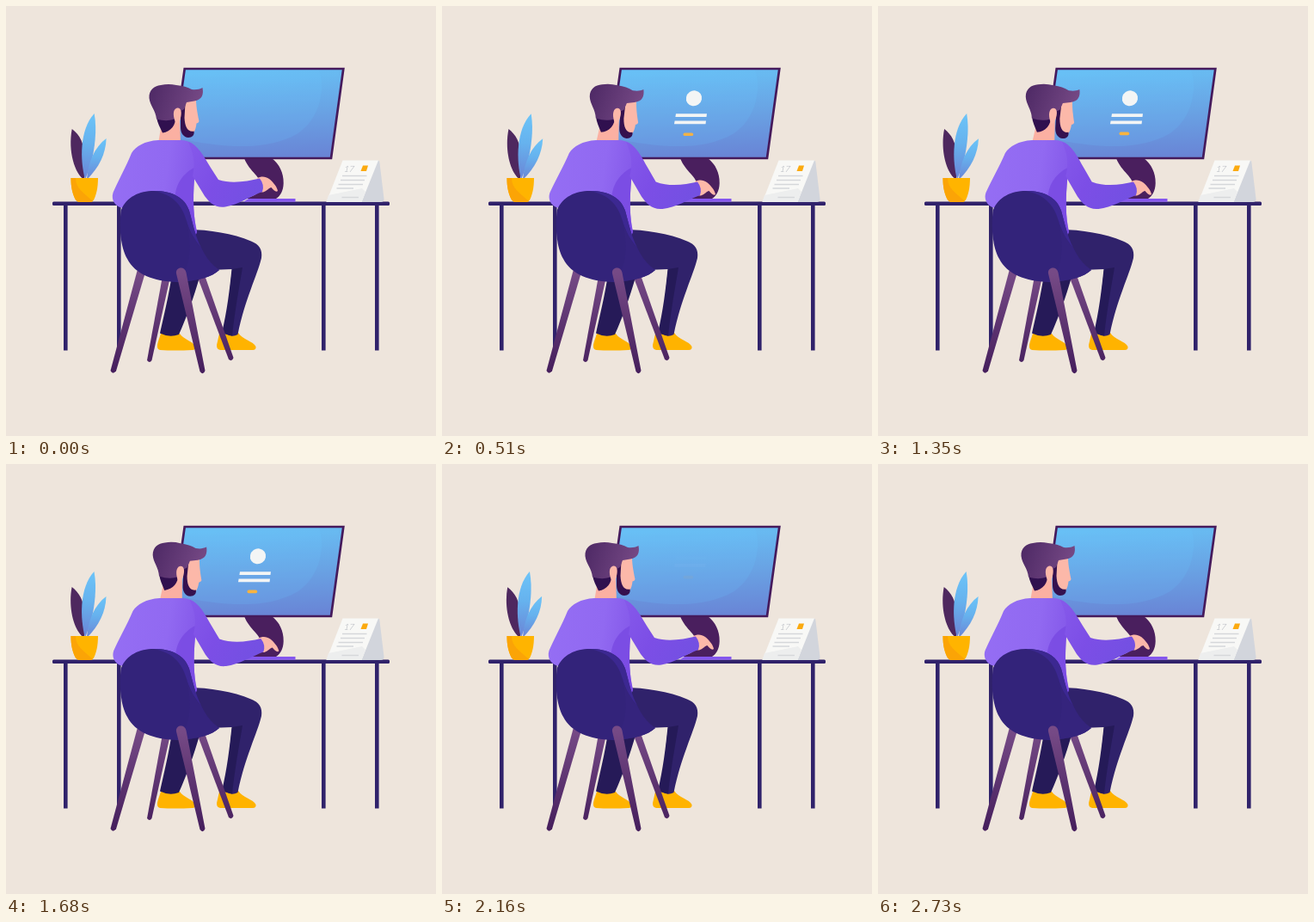
An HTML page for the animation above (2760 ms loop, 500 by 500 pixels).

```html
<!DOCTYPE html>
<html lang="en">
<head>
<meta charset="utf-8">
<title>Desk work</title>
<style>
html, body { margin: 0; width: 100%; height: 100%; overflow: hidden; background: #eee5dc; }
svg { display: block; width: 100%; height: 100%; }
</style>
</head>
<body>
<svg viewBox="0 0 500 500">
  <defs>
    <linearGradient id="screenFill" x1=".45" y1="0" x2=".55" y2="1">
      <stop offset="0" stop-color="#68bff4"/><stop offset=".5" stop-color="#69a3e4"/><stop offset="1" stop-color="#6985d6"/>
    </linearGradient>
    <linearGradient id="leafFill" x1="0" y1="0" x2="0" y2="1">
      <stop offset="0" stop-color="#6cc4f8"/><stop offset=".45" stop-color="#66b2ee"/><stop offset="1" stop-color="#6b84d6"/>
    </linearGradient>
    <linearGradient id="hairFill" x1="0" y1=".3" x2="1" y2=".5">
      <stop offset="0" stop-color="#4f2a66"/><stop offset="1" stop-color="#774a86"/>
    </linearGradient>
    <linearGradient id="bodyFill" x1="0" y1="0" x2="1" y2=".15">
      <stop offset="0" stop-color="#956ef4"/><stop offset=".65" stop-color="#9169f1"/><stop offset="1" stop-color="#8458e9"/>
    </linearGradient>
    <linearGradient id="armFill" gradientUnits="userSpaceOnUse" x1="215" y1="165" x2="300" y2="212">
      <stop offset="0" stop-color="#8558ea"/><stop offset=".45" stop-color="#7c4ee6"/><stop offset="1" stop-color="#7350e2"/>
    </linearGradient>
    <linearGradient id="woodFill" gradientUnits="userSpaceOnUse" x1="0" y1="310" x2="0" y2="425">
      <stop offset="0" stop-color="#764a86"/><stop offset="1" stop-color="#461f5d"/>
    </linearGradient>
  </defs>

  <g fill="#30226b">
    <path d="M67 230h4.600v170.500h-4.600zM129 230h4.600v170.500h-4.600zM367 230h4.600v170.500h-4.600zM429 230h4.600v170.500h-4.600z"/>
    <rect x="54" y="227.500" width="392" height="4.500" rx="1.500"/>
  </g>

  <path fill="#4a1f5e" d="M277 177H309C318 184 323 194 322.700 206C322.500 215 319 221 314 224H276C286 222 294 219 297 211C298 199 283 193 277 177Z"/>
  <path d="M207.700 73H392.300L378 177H193Z" fill="url(#screenFill)"/>
  <path d="M207 74H364C372 96 365 132 338 149C308 166 262 168 197 153Z" fill="#6cc9fb" opacity=".16"/>
  <path d="M207.700 73H392.300L378 177H193Z" fill="none" stroke="#451a5c" stroke-width="2.700"/>
  <g id="content" fill="#f3f5f5">
    <ellipse cx="293" cy="107.300" rx="9.300" ry="8.800" transform="rotate(-35 293 107.300)"/>
    <path d="M272 125.200H308L307.500 129H271.400Z"/>
    <path d="M270.600 133.500H307L306.500 137.200H270Z"/>
    <rect x="280.500" y="146.600" width="11.700" height="3.700" rx="1.700" fill="#f8b340"/>
  </g>

  <path fill="#d2d5dc" d="M432 179.500Q434 179.500 434.300 181L439.500 224Q439.500 228 436 228H412Z"/>
  <path fill="#f8f8f6" d="M391.500 179.500H433L413.500 228H372.500Z"/>
  <path fill="#edeeee" d="M375 220L414 212L418 216L413.500 228H372.500Z"/>
  <text transform="translate(392.500 192.500) skewX(-14)" font-family="Lato, Inter, sans-serif" font-size="10" font-weight="300" fill="#a9adb6">17</text>
  <path fill="#fbaa10" d="M415 185.500H421L419 192H412.500Z"/>
  <path fill="none" stroke="#d5d7da" stroke-width="1.700" d="M391 197.500H419.500M389 202.500H417M386.500 207.500H415M384.500 212H404M390.500 222.500H410"/>

  <g id="leaves">
    <path fill="#4e285f" d="M77 143C86 150 92 160 91 178L91 202C80 195 72 169 77 143Z"/>
    <path fill="url(#leafFill)" d="M102.500 125C106 145 103 165 99 183L92 202C86 180 85 144 102.500 125Z"/>
    <path fill="url(#leafFill)" d="M116.500 154C116 172 108 188 94 202C95 182 103 164 116.500 154Z"/>
  </g>
  <path fill="#ffb400" d="M75.500 200H107C107 212 104.500 221 102 225.500Q100.500 228 97 228H86Q83 228 81 225.500C77 218 75.500 210 75.500 200Z"/>
  <path fill="#fba406" d="M75.500 200H81C81 212 90 217 101 227Q100 228 97 228H86Q83 228 81 225.500C77 218 75.500 210 75.500 200Z"/>

  <path fill="#8556ee" d="M282 224H336.500V227.700H276Z"/>

  <g fill="#ffb300">
    <path d="M180 381L202 381C207 388 218 390 220 396Q220.500 400 217 400Q196 401 179 400Q174 399 177 390Z"/>
    <path d="M248 381L270 380C275 388 288 390 290.500 396Q291 400 287 400H249Q243 399 246 390Z"/>
  </g>
  <path fill="#261a58" d="M193 312H226C218 340 210 362 201 382Q190 386 179 380.500C184 358 189 338 193 312Z"/>
  <path fill="#30226b" d="M212 260C236 260 264 264.500 285 273.500C294 277 298.500 283 297 293C292 314 278 340 269.500 382Q262 386 255 380.500C258 355 260 330 263 306L238 307L205 300Z"/>
  <path fill="#251a58" d="M262.500 306L275 304C271 328 266 355 263 383.500Q258 383 251 380C257 355 260 330 262.500 306Z"/>

  <g id="head">
    <path fill="#fbb0a2" d="M180 142L177 160H203L202 130H190Z"/>
    <path fill="#fcb8a9" d="M204 112L221 108C221 115 222 122 224.500 134Q224 136 221.500 136.500C221 141 220 145 218 147.500L206 146Z"/>
    <path fill="#30104f" d="M175 129L197 128C198 138 192 146 182 147.500C179 141 176 136 175 129Z"/>
    <path fill="#35114f" d="M203 119L208.500 113L207.500 130C208 140 211 147 218.500 145.500C219.500 150 216.500 153 212 153C206.500 152.500 203 148 203 141Z"/>
    <path fill="url(#hairFill)" d="M175 131.500C174 121 167.500 116 166.500 107C166 98 172 93 180 92Q189 90 198 92Q209 93 216 97C221 97.500 225 97 228.500 95C230 103 228 109 219 110.500L210 112L207 120L203 122C201 117 196 120 196 126L197 131Q188 135 175 131.500Z"/>
    <path fill="#fcb8a9" d="M199 118.500C204 118 204.500 124 203 130C202 135 200 138 197.500 136C194.500 130 193 120 199 118.500Z"/>
  </g>

  <g id="torso">
    <path fill="url(#bodyFill)" d="M177 156C161 157 151 163 146 171C140 186 130 204 124.500 217C121.500 226 128 234 136 235L146 260L218 275L222 262C218 245 217 228 219 200L226 175C224 163 214 156 203 156Z"/>
    <path fill="#7a4ae3" opacity=".85" d="M219 188C203 196 195 212 197 228L214 270L222 264C218 245 217 228 219 200Z"/>
  </g>

  <path id="hand" fill="#fcb8a9" d="M292 200C297 197.500 302 198 306 201C311 205 315.500 211 316 215C314 217 311 214 308.500 211C306 211 304 215 299 216.500L293 216Z"/>
  <path id="arm" fill="url(#armFill)"/>

  <g id="chair" stroke-linejoin="round">
    <g fill="url(#woodFill)">
      <path d="M181.500 317H190.500L169.500 412Q167 416 164 412Z"/>
      <path d="M223 316L231 313L264.500 409Q263 414 259 411Z"/>
      <path d="M152.500 308H162.500L128 424.500Q124 429 121.500 424Z"/>
    </g>
    <path fill="#33237a" d="M134 237C140 222 155 215 172 215C194 215 208 223 213 238C217 252 220 268 227 281C234 296 241 302 248 307C240 315 222 320 198 321C172 320 150 312 141 294C133 280 131 255 134 237Z"/>
    <path fill="#3c2891" d="M172 215C194 215 208 223 213 238C217 252 220 268 227 281C220 273 213 262 210 250C205 232 194 219 172 215Z"/>
    <path fill="#35247d" d="M210 250C213 262 220 273 227 281C234 296 241 302 248 307C240 315 222 320 198 321C212 308 218 290 210 250Z"/>
    <path fill="url(#woodFill)" d="M198 311C197 303 208 302 209.500 310L231.500 424Q229.500 430 225.500 425Z"/>
  </g>
</svg>
<script>
const LOOP = 2760;
const $ = id => document.getElementById(id);
const items = [...$('content').children];
const ENTER = [100, 140, 170, 200], LEAVE = [1770, 1820, 1840, 1860];
const baseTurn = items.map(el => el.getAttribute('transform') || '');

// Wrist offset: time, x, y
const wristKeys = [
  [0, 0, 0], [480, 2, 4], [700, 2, 4], [930, -1, 7],
  [1160, 2, 4], [1500, 2, 4], [1950, 0, 0], [LOOP, 0, 0]
];

function ease(t, start, length) {
  const p = Math.min(1, Math.max(0, (t - start) / length));
  return (1 - Math.cos(Math.PI * p)) / 2;
}

function wristAt(t) {
  const i = wristKeys.findIndex(k => k[0] > t);
  const a = wristKeys[i - 1], b = wristKeys[i];
  const p = ease(t, a[0], b[0] - a[0]);
  return [a[1] + (b[1] - a[1]) * p, a[2] + (b[2] - a[2]) * p];
}

function armPath(lean, [dx, dy]) {
  const at = (x, y, follow) => {
    const shift = lean * (262 - y) / 48 * (1 - follow);
    return `${(x + shift + dx * follow).toFixed(2)} ${(y + dy * follow).toFixed(2)}`;
  };
  return `M${at(212, 158, 0)}C${at(223, 161, 0)} ${at(230, 175, 0)} ${at(238, 188, .2)}` +
    `L${at(247, 202, .6)}C${at(262, 207, .8)} ${at(280, 204, 1)} ${at(295, 200.5, 1)}` +
    `Q${at(301, 208, 1)} ${at(298, 216, 1)}` +
    `C${at(285, 221, 1)} ${at(270, 231, .8)} ${at(255, 233.5, .6)}` +
    `C${at(243, 235, .5)} ${at(237, 229, .3)} ${at(231, 221, .2)}` +
    `L${at(217, 198, 0)}C${at(221, 180, 0)} ${at(217, 170, 0)} ${at(212, 158, 0)}Z`;
}

function draw(t) {
  const lean = ease(t, 40, 440) - ease(t, 1500, 600);
  $('head').setAttribute('transform', `translate(${2.4 * lean} 0) rotate(${3.3 * lean} 195 156)`);
  $('torso').setAttribute('transform', `matrix(1 0 ${-lean / 48} 1 ${262 * lean / 48} 0)`);

  const wrist = wristAt(t);
  $('hand').setAttribute('transform', `translate(${wrist})`);
  $('arm').setAttribute('d', armPath(lean, wrist));

  const sway = Math.sin(2 * Math.PI * (t - 100) / LOOP);
  [...$('leaves').children].forEach((leaf, i) => {
    leaf.setAttribute('transform', `rotate(${(sway * .7 + (i ? .3 : -.1)).toFixed(3)} 92 202)`);
  });

  items.forEach((el, i) => {
    const enter = ease(t, ENTER[i], 360), leave = ease(t, LEAVE[i], 360);
    el.setAttribute('transform', `translate(0 ${18 * (1 - enter - leave)}) ${baseTurn[i]}`);
    el.setAttribute('opacity', enter * (1 - leave));
  });
}

const begin = performance.now();
function tick() {
  draw((performance.now() - begin) % LOOP);
  requestAnimationFrame(tick);
}
tick();
</script>
</body>
</html>
```
